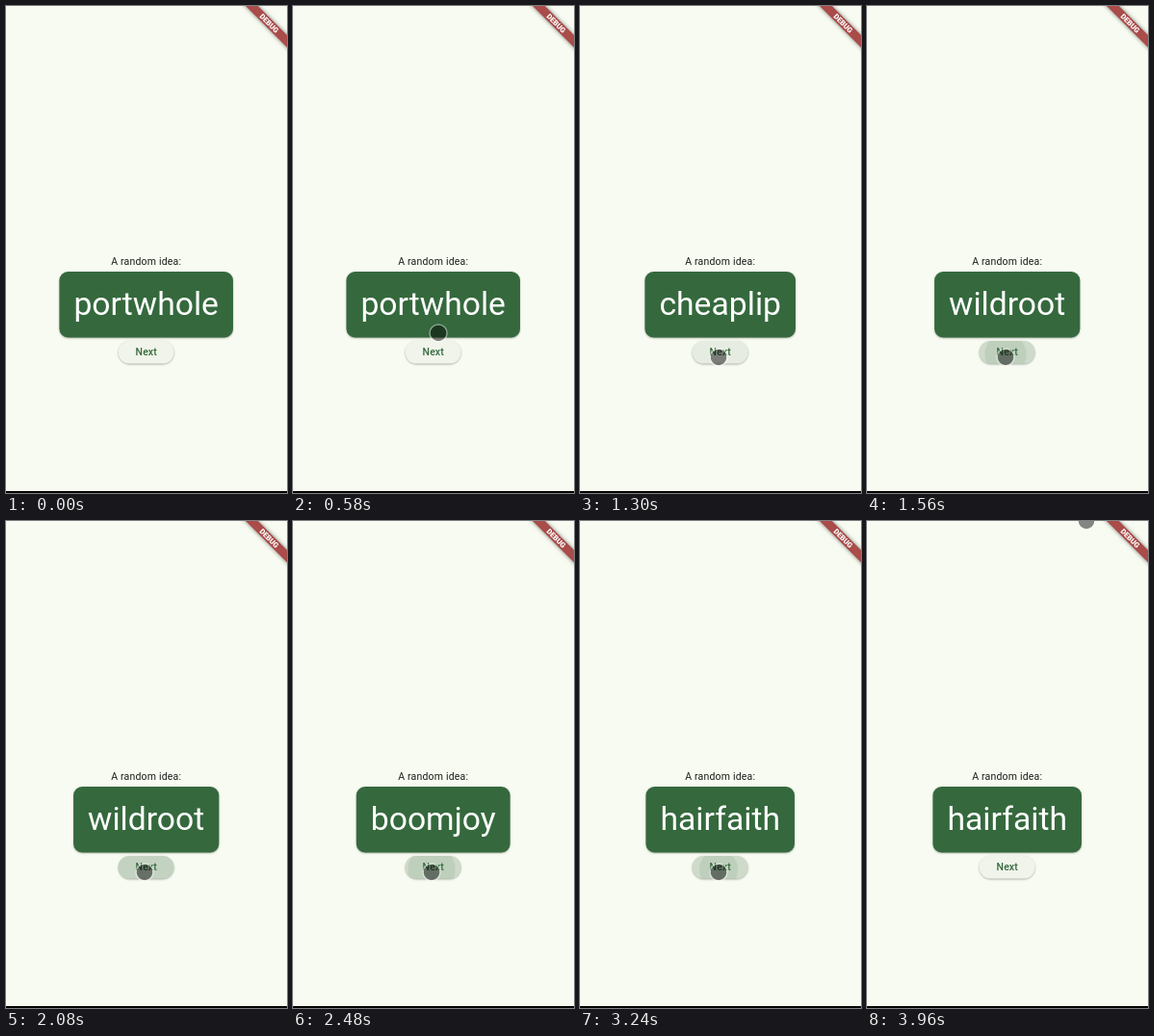
Write an HTML page with a canvas that moves like this. It is 292x506 px and loops after 3980 ms.

```html
<!DOCTYPE html>
<html lang="en">
<head>
<meta charset="utf-8">
<style>
  html, body { margin: 0; width: 292px; height: 506px; overflow: hidden; background: #f7fbf1; }
  canvas { display: block; }
</style>
</head>
<body>
<canvas id="stage" width="292" height="506"></canvas>
<script>
const ctx = document.getElementById('stage').getContext('2d');
const LOOP = 3980, CENTER = 145.7, FONT = 33.7;
const GREEN = '#35693d';
const REST = { x: 144, y: 365 };
const presses = [970, 1470, 1930, 2370, 2810, 3160];
const ideas = [
  [0, 'portwhole'], [960, 'cheaplip'], [1460, 'wildroot'],
  [2370, 'boomjoy'], [2810, 'paylane'], [3160, 'hairfaith']
];
const clamp = v => Math.max(0, Math.min(1, v));

function text(str, x, y, font, color, spacing = 0) {
  ctx.font = font + ' Roboto, sans-serif';
  ctx.letterSpacing = spacing + 'px';
  ctx.fillStyle = color;
  ctx.textAlign = 'center';
  ctx.fillText(str, x, y);
}

function roundRect(x, y, w, h, r) {
  ctx.beginPath();
  ctx.roundRect(x, y, w, h, r);
}

function circle(x, y, r) {
  ctx.beginPath();
  ctx.arc(x, y, r, 0, 7);
}

function shadow(alpha, blur, y) {
  ctx.shadowColor = `rgba(0,0,0,${alpha})`;
  ctx.shadowBlur = blur;
  ctx.shadowOffsetY = y;
}

function card(word) {
  ctx.font = FONT + 'px Roboto, sans-serif';
  ctx.letterSpacing = '0px';
  const w = ctx.measureText(word).width + 30;
  ctx.save();
  shadow(.3, 2, .8);
  ctx.fillStyle = GREEN;
  roundRect(CENTER - w / 2, 276, w, 68.5, 9);
  ctx.fill();
  ctx.restore();
  text(word, CENTER, 321.4, FONT + 'px', '#fff');
}

function button(t, hovered) {
  ctx.save();
  shadow(.3, 2, .8);
  ctx.fillStyle = hovered ? '#e7ece2' : '#f0f4ea';
  roundRect(116.6, 348, 58, 23.6, 11.8);
  ctx.fill();
  ctx.restore();
  text('Next', CENTER, 363, '500 10.5px', GREEN, .08);

  ctx.save();
  roundRect(116.6, 348, 58, 23.6, 11.8);
  ctx.clip();
  for (const start of presses) {
    const age = t - start;
    if (age < 0 || age > 270) continue;
    const fade = 1 - clamp((age - 130) / 140);
    ctx.fillStyle = `rgba(53,105,61,${.14 * clamp(age / 80) * fade})`;
    ctx.fillRect(110, 340, 70, 40);
    ctx.fillStyle = `rgba(53,105,61,${.1 * fade})`;
    circle(REST.x, REST.y - 3, 8 + age * .15);
    ctx.fill();
  }
  ctx.restore();
}

function cursorAt(t) {
  if (t < 100) return null;
  if (t >= 3960) return { x: 228, y: 0 };
  const left = (1 - clamp((t - 100) / 647)) ** 2;
  return { x: REST.x + 106 * left, y: REST.y - 377 * left };
}

function cursor({ x, y }) {
  circle(x, y, 8.3);
  ctx.fillStyle = 'rgba(0,0,0,.47)';
  ctx.fill();
  circle(x, y, 9);
  ctx.strokeStyle = 'rgba(255,255,255,.4)';
  ctx.lineWidth = 1.5;
  ctx.stroke();
}

function banner() {
  ctx.save();
  ctx.translate(291.5, 0);
  ctx.rotate(Math.PI / 4);
  ctx.save();
  shadow(.5, 4.5, 0);
  ctx.fillStyle = '#a94c4a';
  ctx.fillRect(-40, 21, 80, 9);
  ctx.restore();
  text('DEBUG', 0, 28.2, '900 7.6px', '#fff');
  ctx.restore();
}

function draw(now) {
  const t = now % LOOP;
  const pointer = cursorAt(t);
  ctx.fillStyle = '#f7fbf1';
  ctx.fillRect(0, 0, 292, 506);
  text('A random idea:', CENTER, 269, '10.5px', '#191d18', .19);
  card(ideas.findLast(([start]) => t >= start)[1]);
  button(t, pointer && pointer.y > 348);
  banner();
  if (pointer) cursor(pointer);
  ctx.fillStyle = '#000';
  ctx.fillRect(0, 504, 292, 2);
}

let origin;
function tick(now) {
  origin ??= now;
  draw(now - origin);
  requestAnimationFrame(tick);
}
requestAnimationFrame(tick);
</script>
</body>
</html>
```
